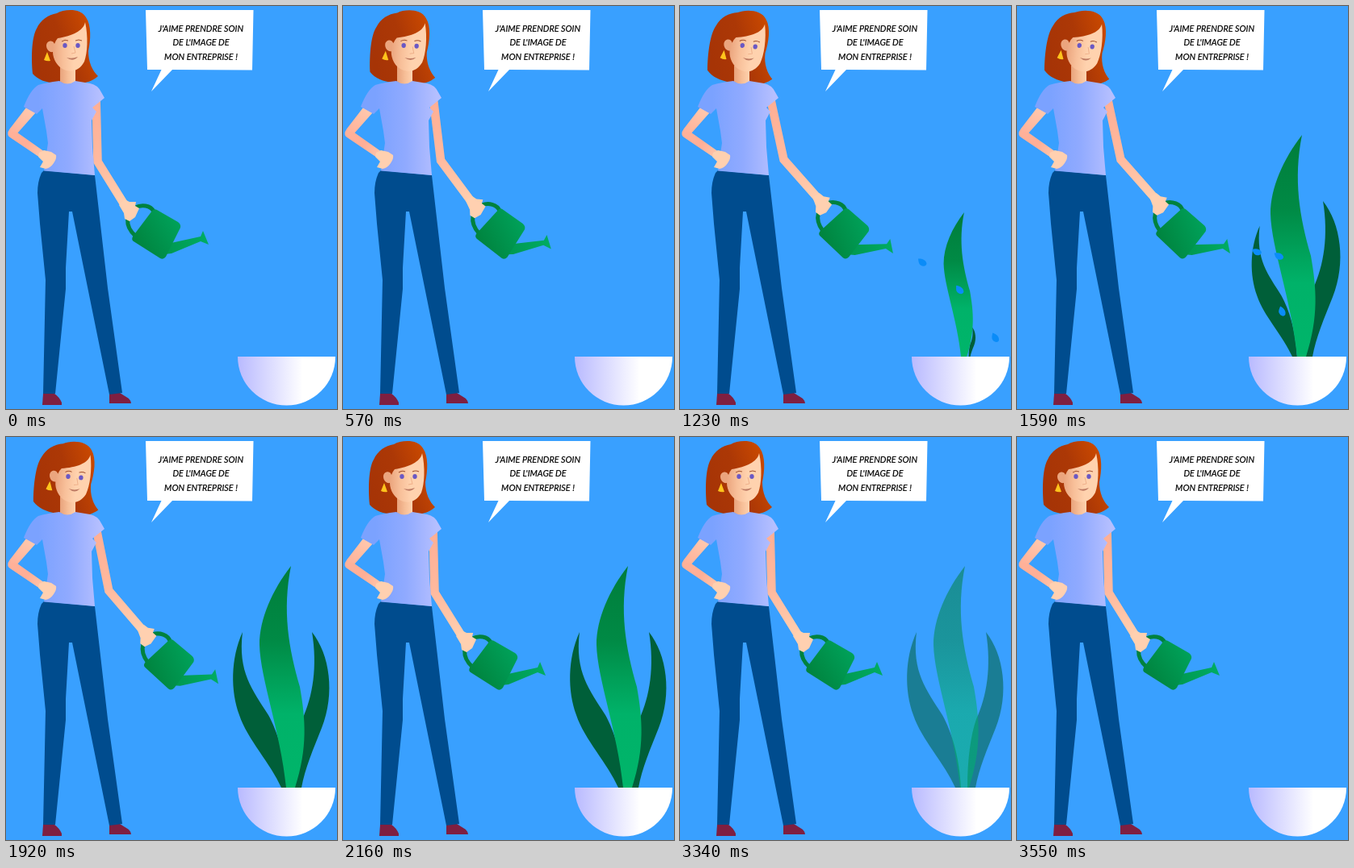
Animation of 410 by 500 pixels, one loop 3580 ms. Source, as an HTML page with a canvas:

```html
<!DOCTYPE html>
<html lang="fr">
<head>
<meta charset="utf-8">
<title>Arrosage</title>
<style>
  html, body { margin: 0; width: 100%; height: 100%; overflow: hidden; background: #39a0ff; }
  canvas { display: block; width: 410px; height: 500px; }
</style>
</head>
<body>
<canvas id="stage" width="410" height="500"></canvas>
<script>
const ctx = document.getElementById('stage').getContext('2d');
const LOOP = 3580;

function blend(x0, y0, x1, y1, ...colors) {
  const g = ctx.createLinearGradient(x0, y0, x1, y1);
  colors.forEach((c, i) => g.addColorStop(i / (colors.length - 1), c));
  return g;
}

const clamp = u => Math.min(1, Math.max(0, u));

function smooth(t, a, b) {
  const u = clamp((t - a) / (b - a));
  return u * u * (3 - 2 * u);
}

const mix = (a, b, u) => a + (b - a) * u;

function fill(d, style) {
  ctx.fillStyle = style;
  ctx.fill(new Path2D(d));
}

function line(d, style, width) {
  ctx.strokeStyle = style;
  ctx.lineWidth = width;
  ctx.stroke(new Path2D(d));
}

function group(draw) {
  ctx.save();
  draw();
  ctx.restore();
}

// Rotation about a pivot, in radians
function turn(x, y, a) {
  ctx.translate(x, y);
  ctx.rotate(a);
  ctx.translate(-x, -y);
}

const hairTone = blend(34, 60, 108, 30, '#a63406', '#ac3806', '#cb4a00');
const skinTone = blend(58, 0, 84, 0, '#eba57e', '#f8c09a', '#ffd2ae');
const shirtTone = blend(40, 0, 116, 0, '#7ba2ff', '#90aaff', '#b5bfff');
const potTone = blend(287, 0, 408, 0, '#b9baff', '#dcdcff', '#ffffff', '#ffffff');
const canTone = blend(165, 300, 218, 265, '#00843f', '#00a45c');
const leafTone = blend(0, 160, 0, 435, '#007d3b', '#008a45', '#00b269', '#00b56a');

// base x, growth start and end, colour, outline
const leaves = [
  [341, 1240, 1710, '#005f39',
    'M293 242C278 275 278 315 289 345C299 375 328 405 341 435H348C346 395 336 365 325 345C305 313 287 292 293 242Z'],
  [358, 1100, 1570, '#005f39',
    'M379 242C401 270 408 318 391 361C381 386 370 412 366 435H356C356 400 360 370 367 350C380 322 386 285 379 242Z'],
  [350, 942, 1422, leafTone,
    'M353 160C330 190 314 225 314 258C315 300 340 365 347 435H358C374 385 371 350 364 310C350 262 342 215 353 160Z']
];

// launch time, speed x, speed y (px/s)
const drops = [
  [690, 400, 150], [750, 330, 100], [820, 410, 140], [925, 420, 158],
  [1030, 420, 130], [1140, 420, 158], [1310, 236, 93],
  [1442, 420, -20], [1507, 420, 26]
];
const FALL = 699;

function drawDrops(t) {
  for (const [start, vx, vy] of drops) {
    const s = (t - start) / 1000;
    const y = 298 + vy * s + FALL * s * s;
    if (s < 0 || y > 422) continue;
    group(() => {
      ctx.translate(262 + vx * s, y);
      ctx.rotate(Math.atan2(vy + 2 * FALL * s, vx));
      fill('M-7 -1C-3 -4 2 -5 5 -2C7 1 4 4 0 4C-3 4 -5 1 -7 -1Z', '#0a8cf8');
    });
  }
}

function drawPlant(t) {
  const alpha = t < 3190 ? 1 : clamp((3550 - t) / 390);
  for (const [x, from, to, tone, shape] of leaves) {
    const size = smooth(t, from, to);
    if (!size) continue;
    group(() => {
      ctx.globalAlpha = alpha;
      ctx.translate(x, 435);
      ctx.scale(size, size);
      ctx.translate(-x, -435);
      fill(shape, tone);
    });
  }
}

function drawPot() {
  fill('M287 435H408A60.5 60.5 0 0 1 287 435Z', potTone);
}

function drawLegs() {
  fill('M46 481H60Q66 485 69 492V495H45Z', '#7e1f41');
  fill('M128 480H141L152 487Q155 490 155 493H128Z', '#7e1f41');
  fill('M47 204L110 210L126 350L144 480L128 482L82 255H78L74 325V351L61 481H46L49 340L42 270L39 232Q39 218 44 207Z', '#004c8e');
}

function drawLeftArm() {
  fill('M25 126L5 152Q2 156 3 160L14 158L37 132Z', blend(30, 128, 8, 158, '#ffc8ad', '#ffb199'));
  fill('M3 155Q1 160 5 163L42 188L48 181L14 157Z', blend(5, 158, 46, 186, '#ffb199', '#ffae96', '#ffc6aa'));
}

function drawFist() {
  fill('M41 182L47 179L56 181L62 185Q63 189 59 195Q55 201 49 202L42 200L46 193L40 187Z', '#ffd0b0');
}

function drawShirt() {
  fill('M66 93Q76 100 86 93L104 96Q114 98 118 107L122 114L107 126L112 131L106 142L107 175L110 210L47 204.500L52 170L50 155L45 127L38 134L22 125Q30 104 40 98Q50 95 66 93Z', shirtTone);
}

const canAngle = p => p * 11 * Math.PI / 180;

function placeCan(p) {
  ctx.translate(mix(187, 204, p), mix(281, 280, p));
  ctx.rotate(canAngle(p));
  ctx.translate(-187, -281);
}

function drawRightArm(p) {
  const a = canAngle(p);
  const wx = mix(187, 204, p) - 40 * Math.cos(a) + 34 * Math.sin(a);
  const wy = mix(281, 280, p) - 40 * Math.sin(a) - 34 * Math.cos(a);
  ctx.lineJoin = 'miter';
  line(`M111.500 112L${mix(113.5, 128.5, p)} ${mix(193, 190.5, p)}L${wx} ${wy}`,
    blend(110, 120, 150, 250, '#ffaf95', '#ffb99e', '#ffd0b0'), 10.5);
}

function drawCan(p) {
  group(() => {
    placeCan(p);
    line('M183 255C179 247 168 246 160 250C149 257 146 272 160 285', '#00823e', 5);
    fill('M200 295L209 293L241 286L244 279L251 296L241 292L205 307L196 308Z',
      blend(203, 300, 250, 288, '#009a52', '#00ac63'));
    fill('M187 253L213 268Q217 271 216 275L198 311Q195 315 191 313L158 292Q155 290 157 286L181 254Q184 251 187 253Z', canTone);
    fill('M140 247L147 240L153 243L161 243L160 248L165 251L160 262L153 267L147 264L146 257Z', '#ffd0b0');
  });
}

function drawHairBack() {
  fill('M63 9C72 4 92 2 99 14C106 24 105 42 102 56C102 70 107 80 114 87C105 95 94 97 84 95L62 96C50 95 40 92 33 84C31 62 32 38 38 28C43 17 52 11 63 9Z', hairTone);
}

function drawNeck() {
  fill('M67 74H86V94Q77 101 67 94Z', blend(67, 0, 86, 0, '#e8a27b', '#f6bd96', '#ffd2ae'));
}

function drawFace() {
  fill('M98 20C96 31 82 37 64 40Q62 42 60 47C58 41 50 43 50 49C50 54 54 58 58 57C58 66 64 76 72 79C82 83 91 80 97 69C101 58 102 38 98 20Z', skinTone);
  fill('M51 57L47 67Q51 69 55 68Z', '#ffc41c');
  line('M69 44Q73 41 77 43M86 43Q90 41 94 43', '#a2502e', 1);
  ctx.fillStyle = '#6a58c4';
  for (const x of [73, 89]) {
    ctx.beginPath();
    ctx.ellipse(x, 49, 2.7, 3, 0, 0, 7);
    ctx.fill();
  }
  line('M84 50L86 58L81 59', '#eeb08a', 1);
  fill('M75 64Q82 66 89 63Q83 70 75 64Z', '#bd7a63');
}

function drawBubble() {
  fill('M173 5H306.500L305 79.500L206 79L180 106L192.500 79H175Z', '#fff');
  ctx.font = 'italic 10.8px Lato, "Open Sans", sans-serif';
  ctx.textAlign = 'center';
  ctx.fillStyle = ctx.strokeStyle = '#000';
  ctx.lineWidth = 0.2;
  const rows = ["J'AIME PRENDRE SOIN", "DE L'IMAGE DE", 'MON ENTREPRISE !'];
  rows.forEach((row, i) => {
    const y = 31.5 + 17.6 * i;
    ctx.fillText(row, 241.5, y);
    ctx.strokeText(row, 241.5, y);
  });
}

function render(t) {
  const pose = smooth(t, 420, 720) - smooth(t, 1870, 2170);
  const head = draw => group(() => {
    turn(76, 92, pose * 0.1);
    draw();
  });
  ctx.fillStyle = '#39a0ff';
  ctx.fillRect(0, 0, 410, 500);
  drawBubble();
  head(drawHairBack);
  drawLegs();
  drawLeftArm();
  drawRightArm(pose);
  drawNeck();
  drawShirt();
  drawFist();
  head(drawFace);
  drawCan(pose);
  drawPlant(t);
  drawDrops(t);
  drawPot();
}

const begin = performance.now();
function tick() {
  render((performance.now() - begin) % LOOP);
  requestAnimationFrame(tick);
}
tick();
</script>
</body>
</html>
```
